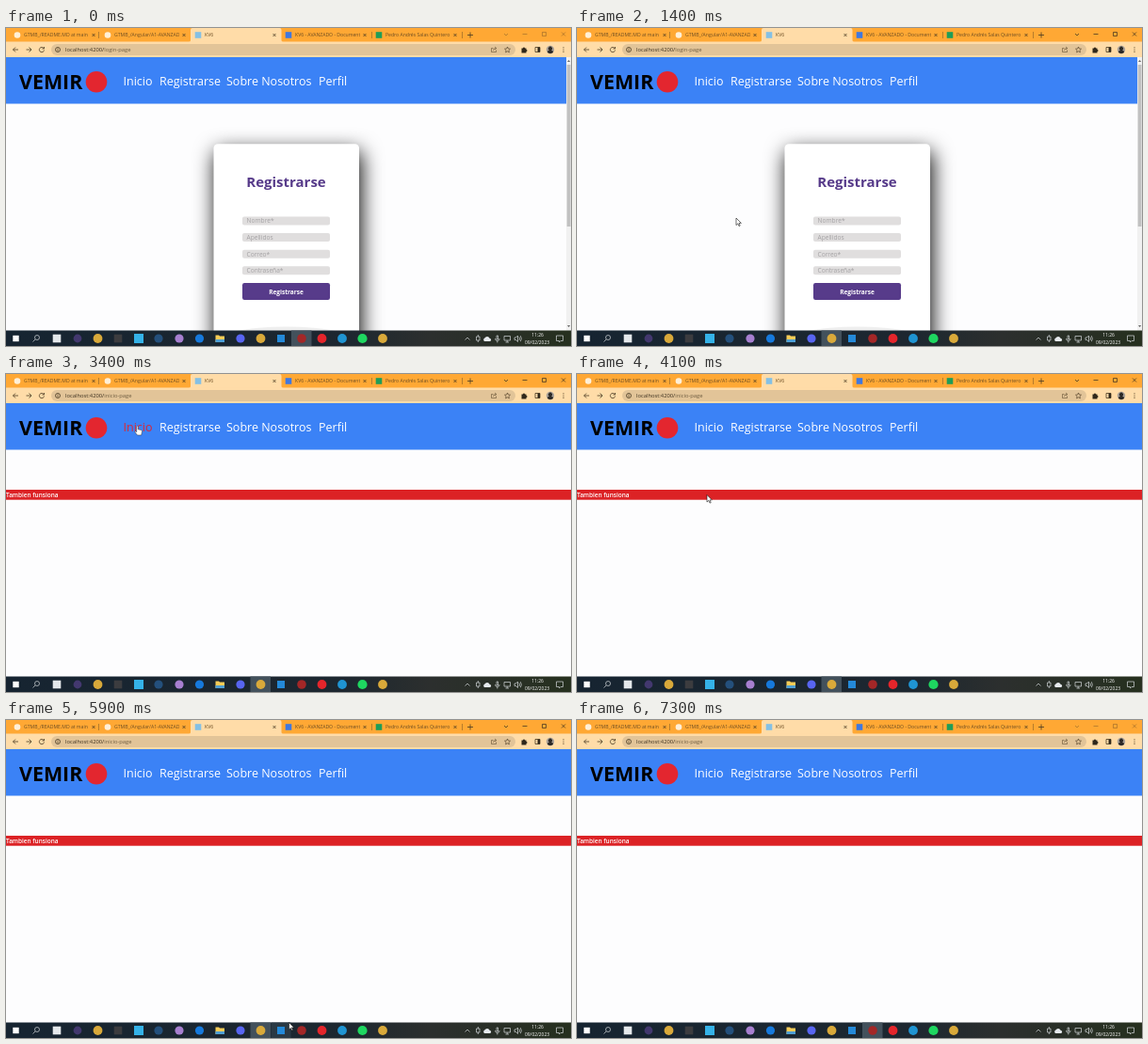
Write an HTML page that moves like this. It is 600 by 338 pixels and loops after 7400 ms.

```html
<!DOCTYPE html>
<html lang="es">
<head>
<meta charset="utf-8">
<title>Registro</title>
<style>
  html, body { margin: 0; width: 100%; height: 100%; overflow: hidden; background: #fdfdfe; }
  svg { display: block; }
  #stage { width: 100vw; height: 100vh; }
  text { font-family: "Open Sans", "Noto Sans", sans-serif; white-space: pre; }
  .line { fill: none; stroke: #4a3a22; stroke-width: .8; }
  .tray { fill: none; stroke: #d5d9dc; stroke-width: .7; }
  .bold { font-weight: 700; }
  .card { filter: drop-shadow(2.2px 8.8px 11px #000); }
</style>
</head>
<body>
<svg id="stage" viewBox="0 0 600 338">
  <linearGradient id="bar">
    <stop offset="0" stop-color="#162431"/>
    <stop offset=".6" stop-color="#1d2730"/>
    <stop offset=".75" stop-color="#2c2f2e"/>
    <stop offset="1" stop-color="#26301f"/>
  </linearGradient>
  <rect width="600" height="338" fill="#fdfdfe"/>

  <g id="login">
    <rect class="card" x="220.5" y="123.2" width="154.5" height="220" rx="4.5" fill="#fff"/>
    <ellipse cx="297.7" cy="334.5" rx="77" ry="17" fill="#eee"/>
    <text class="bold" x="297.5" y="168.5" font-size="15" fill="#573b8a" text-anchor="middle">Registrarse</text>
    <g id="fields" font-size="6.6" fill="#a3a1a3"></g>
    <rect x="251" y="271" width="93" height="18" rx="2.2" fill="#573b8a"/>
    <text class="bold" x="297.5" y="282.6" font-size="6.5" fill="#fff" text-anchor="middle">Registrarse</text>
  </g>

  <g id="home">
    <rect y="123" width="600" height="10.7" fill="#dc2225"/>
    <text x="0" y="131" font-size="6.45" font-weight="600" fill="#fff">Tambien funsiona</text>
  </g>

  <rect y="31" width="600" height="49.5" fill="#3b82f6"/>
  <text class="bold" x="14" y="65.2" font-size="21.4">VEMIR</text>
  <circle cx="96" cy="57.3" r="11.3" fill="#e3262f"/>
  <g font-size="12.5" fill="#fff">
    <text id="start" x="124.5" y="61">Inicio</text>
    <text x="163" y="61">Registrarse</text>
    <text x="234" y="61">Sobre Nosotros</text>
    <text x="332" y="61">Perfil</text>
  </g>

  <g id="scroll">
    <rect x="595" y="31" width="5" height="291" fill="#f1f1f1"/>
    <rect x="595.7" y="39" width="3.8" height="172" fill="#c1c1c1"/>
    <path d="M596 36l1.6-2 1.6 2z" fill="#666"/>
    <path d="M596 316l1.6 2 1.6-2z" fill="#666"/>
  </g>

  <rect width="600" height="15" fill="#ffa834"/>
  <path d="M194 15q2 0 2-2V2q0-2 2-2h92.500q2 0 2 2v11q0 2 2 2z" fill="#ffdca8"/>
  <rect y="14.5" width="600" height="16.5" fill="#ffdca8"/>
  <g id="tabs" font-size="5.1" fill="#6b4e23"></g>
  <path class="line" d="M98.500 4v7M388.500 4v7M484.500 4v7" opacity=".5"/>
  <path class="line" d="M490 7.500h6M493 4.500v6"/>
  <path id="buttons" class="line" d="M529 6l2 2 2-2M548.500 6.500h5M569.500 4.500h4v4h-4zM590 4.500l4 4M594 4.500l-4 4"/>

  <rect x="48" y="17" width="493" height="12" rx="6" fill="#e2c498"/>
  <path class="line" d="M13 23H7.500M10 20.500L7.500 23l2.500 2.500M21.500 23H27M24.500 20.500L27 23l-2.500 2.500M40 21.500a2.600 2.600 0 1 0 .5 2M40.500 20v2h-2"/>
  <circle class="line" cx="55" cy="23" r="2.5"/>
  <path class="line" d="M55 22.500v2M55 21.200v.6"/>
  <text x="63" y="25" font-size="5.8" fill="#3b2f1e">localhost:4200/<tspan id="path" fill="#6d5b40"></tspan></text>
  <path class="line" d="M517.500 21.500h-2v4h5v-2M517.500 24q0-2.500 3-2.500M519 20l1.800 1.500-1.800 1.500" opacity=".65"/>
  <path class="line" d="M532.500 20l.9 2 2.100.2-1.600 1.500.5 2.200-1.900-1.100-1.900 1.100.5-2.200-1.600-1.500 2.100-.2z" opacity=".8"/>
  <path d="M547.500 21.500h1.500a1 1 0 0 1 2 0h1.500v1.500a1 1 0 0 1 0 2v1.500h-5z" fill="#30281b"/>
  <path class="line" d="M562 20.500h5v5h-5z"/>
  <rect x="564.500" y="20.500" width="2.500" height="5" fill="#30281b"/>
  <circle cx="578" cy="23" r="4.200" fill="#a9a096"/>
  <path d="M574.800 25.700q.4-2 2.200-2.300a2 2 0 1 1 2 0q1.800.3 2.200 2.300a4.200 4.200 0 0 1-6.400 0" fill="#2c2927"/>
  <g fill="#4a3a22"><circle cx="592" cy="20.800" r=".6"/><circle cx="592" cy="23" r=".6"/><circle cx="592" cy="25.200" r=".6"/></g>

  <rect y="321.500" width="600" height="16.500" fill="url(#bar)"/>
  <rect id="hover" x="281.500" y="321.500" width="21" height="16.500" fill="#2a3944"/>
  <rect id="active" y="321.500" width="21.500" height="16.500" fill="#43515c"/>
  <g id="apps"></g>
  <circle class="tray" cx="33" cy="329" r="2.500"/>
  <path class="tray" d="M31 331l-2.500 2.500M487.500 331.500l2.500-2.500 2.500 2.500"/>
  <path d="M222.500 326.500h3.500l1 1h5v6.500h-9.500z" fill="#f6cc57"/>
  <path d="M222.500 331h9.500v3h-9.500z" fill="#4f9fd4"/>
  <path class="tray" d="M499.500 328h3.500v4h-3.500zM501.300 326v2M501.300 332v2"/>
  <path d="M508 333a2 2 0 0 1 .5-3.500 2.700 2.700 0 0 1 5 .2 1.700 1.700 0 0 1 .5 3.300z" fill="#e6eaee"/>
  <path class="tray" d="M521 327h1.500v4H521zM519.500 330q0 2.500 2.300 2.500t2.300-2.500M521.800 332.500v2M529 327.500h6.500v4.500H529zM532.200 332v2M530.500 334h3.500M540 329h1.500l2-2v6.500l-2-2H540zM545 328.500q1.200 1.700 0 3.500M546.300 327.200q2.200 3 0 6"/>
  <g font-size="4.900" fill="#fff" text-anchor="middle">
    <text x="564.500" y="328.300">11:26</text>
    <text x="564" y="336">09/02/2023</text>
  </g>
  <path class="tray" d="M584.500 327h7v5.500h-2.500l-1.500 1.500v-1.500h-3z"/>

  <g id="cursor">
    <path id="arrow" d="M0 0v7.600l1.800-1.700 1.200 2.700 1.200-.5-1.200-2.700h2.400z" fill="#fff" stroke="#111" stroke-width=".6"/>
    <path id="hand" d="M-.8.800q.8-1.200 1.500 0v3l3.500.8q1 .4.800 1.500l-.8 3.900h-4.200l-2.800-3.600q.6-1 2 .3z" fill="#fff" stroke="#333" stroke-width=".5"/>
  </g>
</svg>

<script>
const $ = id => document.getElementById(id);
const show = (id, on) => $(id).setAttribute("visibility", on ? "inherit" : "hidden");
const dot = (x, y, r, color) => `<circle cx="${x}" cy="${y}" r="${r}" fill="${color}"/>`;
const box = (x, y, r, color) =>
  `<rect x="${x - r}" y="${y - r}" width="${2 * r}" height="${2 * r}" fill="${color}"/>`;

$("fields").innerHTML = ["Nombre*", "Apellidos", "Correo*", "Contraseña*"].map((label, i) => {
  const y = 200.5 + i * 17.6;
  return `<rect x="251" y="${y}" width="93" height="9" rx="2" fill="#e0dede"/>
    <text x="255.5" y="${y + 6.9}">${label}</text>`;
}).join("");

$("tabs").innerHTML = [
  [12, dot, "#fff0d8", "GTMB_/README.MD at main"],
  [108, dot, "#fff0d8", "GTMB_/Angular/A1-AVANZADO"],
  [204, box, "#84c0e4", "KV6"],
  [300, box, "#3f78e0", "KV6 - AVANZADO - Documentos"],
  [396, box, "#1f9d58", "Pedro Andrés Salas Quintero"]
].map(([x, icon, color, title]) => icon(x, 7.5, 3.3, color) +
  `<svg x="${x + 7}" y="0" width="69" height="15"><text y="9.300">${title}</text></svg>
   <path class="line" d="M${x + 79.5} 6l3 3m0-3l-3 3"/>`).join("");

$("apps").innerHTML = [
  [10.5, box, 3.2, "#fff"], [54, box, 4.3, "#e4e8eb"], [76, dot, 4.4, "#43386f"],
  [97.5, dot, 4.9, "#d9a93a"], [119, box, 4.3, "#3c3c3f"], [141, box, 5, "#35b2e8"],
  [162, dot, 4.6, "#24507c"], [184, dot, 4.6, "#a77fd0"], [205.5, dot, 4.6, "#1679dc"],
  [249, dot, 4.6, "#5865f2"], [270.5, dot, 4.9, "#d9a93a"], [292, box, 4, "#2489d8"],
  [314, dot, 4.8, "#a32727"], [335.5, dot, 4.9, "#e5252b"], [357, dot, 4.9, "#1f94d2"],
  [378.5, dot, 5.1, "#1ed760"], [400, dot, 4.9, "#d9a93a"]
].map(([x, icon, r, color]) => icon(x, 330, r, color)).join("");

// Pointer tip: time, x, y
const route = [
  [700, 270, 329], [1400, 169, 202], [1600, 165, 188], [2400, 142, 55], [2700, 141, 54],
  [2900, 139.500, 55], [3500, 139.500, 55], [4100, 138, 128.500], [5100, 138, 128.500],
  [5500, 293.500, 321], [5900, 300.500, 321.500], [6100, 312, 328], [6500, 313, 328]
];

function pointAt(t) {
  const i = Math.max(1, route.findIndex(p => p[0] >= t));
  const [t0, x0, y0] = route[i - 1], [t1, x1, y1] = route[i];
  const k = (t - t0) / (t1 - t0), e = k * k * (3 - 2 * k);
  return [x0 + (x1 - x0) * e, y0 + (y1 - y0) * e];
}

function draw(t) {
  const onLogin = t < 2800;
  const focused = t >= 800 && t < 6200;
  const pointer = t >= route[0][0] && t < route.at(-1)[0];
  let over = false;
  if (pointer) {
    const [x, y] = pointAt(t);
    over = x > 124 && x < 157 && y > 46 && y < 68;
    $("cursor").setAttribute("transform", `translate(${x} ${y})`);
  }
  show("cursor", pointer);
  show("hand", over);
  show("arrow", !over);
  show("login", onLogin);
  show("scroll", onLogin);
  show("home", !onLogin);
  show("hover", t >= 5500 && t < 6000);
  $("path").textContent = onLogin ? "login-page" : "inicio-page";
  $("start").setAttribute("fill", over ? "#dc2635" : "#fff");
  $("active").setAttribute("x", focused ? 259.5 : 303);
  $("buttons").setAttribute("opacity", focused ? 1 : .45);
}

const began = performance.now();
function tick() {
  const t = (performance.now() - began) % 7400;
  draw(Math.floor(t / 100) * 100);
  requestAnimationFrame(tick);
}
tick();
</script>
</body>
</html>
```
